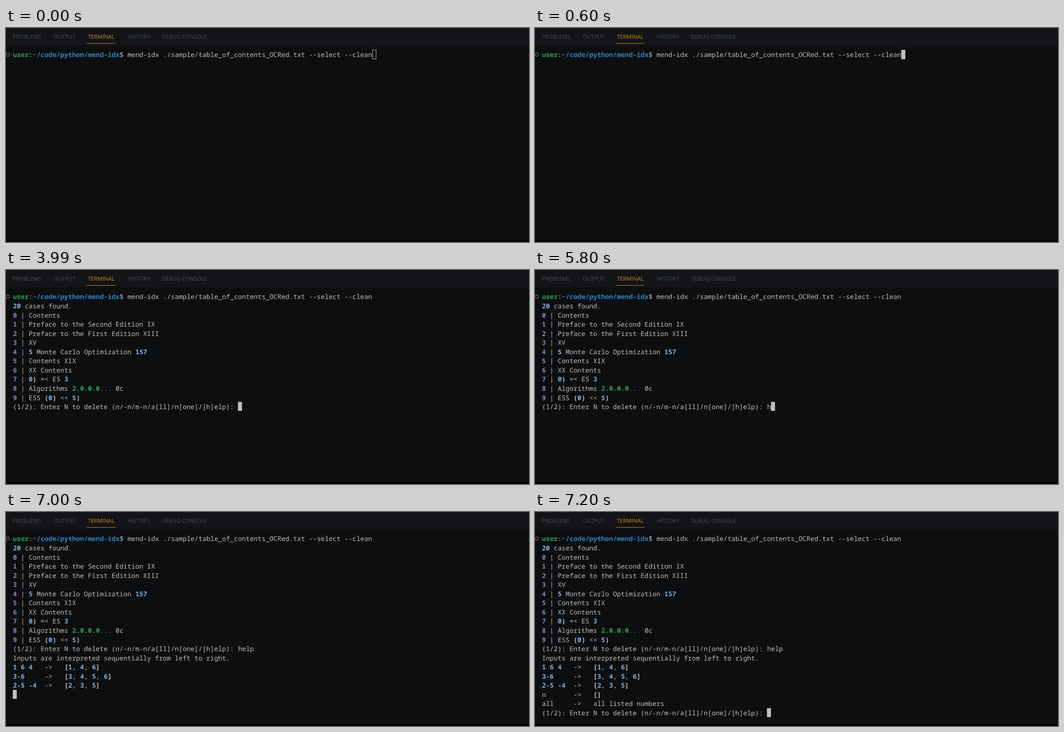
An HTML page that plays this animation: 1168x480 px, repeating every 8000 ms.

```html
<!DOCTYPE html>
<html lang="en">
<head>
<meta charset="utf-8">
<title>Terminal session</title>
<style>
  html, body { margin: 0; width: 100%; height: 100%; overflow: hidden; background: #0c0e10; }
  svg { display: block; width: 100vw; height: 100vh; }
  text { white-space: pre; text-rendering: geometricPrecision; }
  .tab { font: 12.35px "Open Sans", "Noto Sans", sans-serif; fill: #494d52; }
  .tab.on { fill: #d08c1c; }
  .term { font: 14.706px "Noto Sans Mono", "DejaVu Sans Mono", monospace; fill: #bfbfbf; font-variant-ligatures: none; }
  .w, .b, .p, .g, .c { font-weight: 700; }
  .b { fill: #7db1dc; }
  .p { fill: #8482ba; }
  .g { fill: #2f9e54; }
  .c { fill: #2c85c2; }
  .y { fill: #80704a; }
</style>
</head>
<body>
<svg id="stage" viewBox="0 0 1168 480">
  <rect width="1168" height="480" fill="#0c0e10"/>
  <rect width="1168" height="39" fill="#121417"/>
  <rect y="476.5" width="1168" height="3.5" fill="#040406"/>
  <rect x="180" y="34" width="65" height="1" fill="#d08c1c"/>
  <circle cx="4.2" cy="59.7" r="3.7" fill="none" stroke="#55585b" stroke-width="1.9"/>
</svg>
<script>
const LOOP = 8000, LEFT = 15.05, TOP = 49.2, CHAR = 8.8236, LINE = 20.56;
const INSET = 0.4, BASELINE = 16.2;
const stage = document.getElementById('stage');

function add(tag, attrs, parent = stage) {
  const el = document.createElementNS('http://www.w3.org/2000/svg', tag);
  for (const k in attrs) el.setAttribute(k, attrs[k]);
  return parent.appendChild(el);
}
function label(cls, x, y, str, parent) {
  const el = add('text', { class: cls, x, y }, parent);
  el.textContent = str;
  return el;
}
const colX = c => LEFT + c * CHAR;
const rowY = r => TOP + r * LINE;
const print = (cls, col, row, str, parent) =>
  label(cls, colX(col) + INSET, rowY(row) + BASELINE, str, parent);

[[15, 'PROBLEMS'], [106.5, 'OUTPUT'], [183, 'TERMINAL'], [272, 'HISTORY'], [348, 'DEBUG CONSOLE']]
  .forEach(([x, s]) => label(s === 'TERMINAL' ? 'tab on' : 'tab', x, 24.4, s));

// Each piece starts with its style letter; n is plain text.
const prompt = 'n(1/2): Enter N to delete (n/-n/m-n/a[ll]/n[one]/[h]elp): ';
const PROMPT_COLS = prompt.length - 1;
const item = (n, ...rest) => ['p' + n, 'n | ', ...rest];
const list = (...nums) => ['w[', ...nums.flatMap((n, i) => i ? ['n, ', 'b' + n] : ['b' + n]), 'w]'];
const help = (style, input, ...result) => [style + input.padEnd(8), 'n->   ', ...result];

const command = 'n$ mend-idx ./sample/table_of_contents_OCRed.txt --select --clean';
const blocks = [
  { at: 0, rows: [['guser', 'n:', 'c~/code/python/mend-idx', command]] },
  { at: 3990, rows: [
    ['b20', 'n cases found.'],
    item(0, 'nContents'),
    item(1, 'nPreface to the Second Edition IX'),
    item(2, 'nPreface to the First Edition XIII'),
    item(3, 'nXV'),
    item(4, 'b5', 'n Monte Carlo Optimization ', 'b157'),
    item(5, 'nContents XIX'),
    item(6, 'nXX Contents'),
    item(7, 'b0', 'w)', 'n =< ES ', 'b3'),
    item(8, 'nAlgorithms ', 'g2.0.0.0', 'y...', 'n 0c'),
    item(9, 'nESS ', 'w(', 'b0', 'w)', 'n << ', 'b5', 'w)'),
    [prompt]
  ] },
  { at: 7000, rows: [
    ['nInputs are interpreted sequentially from left to right.'],
    help('b', '1 6 4', ...list(1, 4, 6)),
    help('b', '3-6', ...list(3, 4, 5, 6)),
    help('b', '2-5 -4', ...list(2, 3, 5))
  ] },
  { at: 7200, rows: [
    help('n', 'n', 'w[]'),
    help('n', 'all', 'nall listed numbers'),
    [prompt]
  ] }
];

let row = 0;
for (const block of blocks) {
  block.el = add('g', { class: 'term' });
  for (const pieces of block.rows) {
    let col = 0;
    for (const piece of pieces) {
      const str = piece.slice(1);
      print(piece[0], col, row, str, block.el);
      col += str.length;
    }
    row++;
  }
}

const typed = print('term', PROMPT_COLS, 12, '');
const keys = [[5800, 1], [6000, 3], [6200, 4]];
const cursor = add('rect', {});
const moves = [[0, 91, 0], [3790, 0, 1], [3990, PROMPT_COLS, 12], [7000, 0, 17], [7200, PROMPT_COLS, 19]];
const latest = (steps, t) => steps.filter(s => s[0] <= t).pop();

function draw(t) {
  for (const b of blocks) b.el.setAttribute('visibility', t >= b.at ? 'visible' : 'hidden');
  const count = (latest(keys, t) || [0, 0])[1];
  typed.textContent = 'help'.slice(0, count);

  let [, col, line] = latest(moves, t);
  if (line === 12) col += count;
  const hollow = t < 600, inset = hollow ? 0.5 : 0;
  const top = Math.round(rowY(line)), bottom = Math.round(rowY(line + 1));
  const box = {
    x: Math.round(colX(col)) + inset,
    y: top + inset,
    width: 9 - 2 * inset,
    height: bottom - top - 2 * inset,
    fill: hollow ? 'none' : '#bfbfbf',
    stroke: hollow ? '#bfbfbf' : 'none'
  };
  for (const k in box) cursor.setAttribute(k, box[k]);
}

const start = performance.now();
function tick() {
  draw((performance.now() - start) % LOOP);
  requestAnimationFrame(tick);
}
tick();
</script>
</body>
</html>
```
